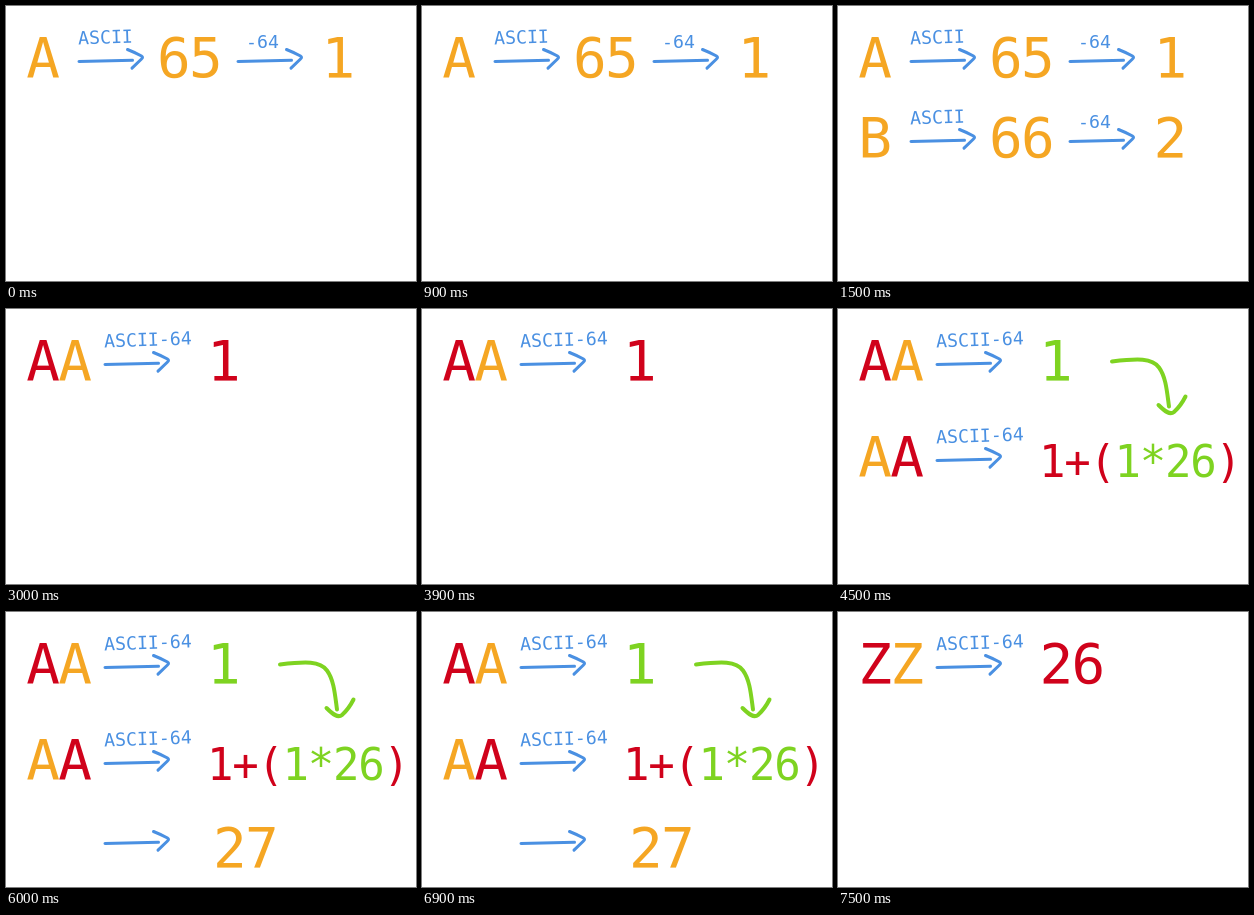
Write an HTML page that moves like this. It is 410x275 px and loops after 8 s.

```html
<!DOCTYPE html>
<html lang="en">
<head>
<meta charset="utf-8">
<title>Letters to numbers</title>
<style>
  html, body { margin: 0; width: 100%; height: 100%; overflow: hidden; background: #fff; }
  svg { display: block; width: 410px; height: 275px; font-family: "DejaVu Sans Mono", monospace; }
  path { fill: none; stroke-linecap: round; stroke-linejoin: round; }
  .big { font-size: 56px; letter-spacing: -1.7px; }
  .medium { font-size: 44px; letter-spacing: -1.3px; }
  .small { font-size: 18.2px; }
</style>
</head>
<body>
<svg id="stage" viewBox="0 0 410 275"></svg>
<script>
const ORANGE = '#f5a623', BLUE = '#4a90e2', RED = '#d0021b', GREEN = '#7ed321';
const LOOP = 8000, STEP = 1500, BASELINE = 71.4;

// Each run is a [string, colour] pair.
const text = (size, x, y, ...runs) =>
  `<text class="${size}" x="${x}" y="${y}">` +
  runs.map(([string, color]) => `<tspan fill="${color}">${string}</tspan>`).join('') +
  '</text>';

const big = (x, ...runs) => text('big', x, BASELINE, ...runs);

const arrow = (x, y) =>
  `<path transform="translate(${x} ${y})" stroke="${BLUE}" stroke-width="3"
    d="M1 0.5 L54.5 -0.7 M49.5 -11.5 Q57 -8.5 63.5 -5 Q65.5 -3.8 63.5 -2 L54 7.2"/>`;

const tilted = (string, x, y) =>
  `<g transform="translate(${x} ${y}) rotate(-2)">${text('small', 0, 0, [string, BLUE])}</g>`;

const shift = (dy, content) => `<g transform="translate(0 ${dy})">${content}</g>`;

const singleRow = (letter, code, result) =>
  big(20.3, [letter, ORANGE]) +
  tilted('ASCII', 72.3, 38.5) + arrow(72, 55) +
  big(151, [code, ORANGE]) +
  text('small', 240, 42, ['-64', BLUE]) + arrow(231, 55) +
  big(315.5, [result, ORANGE]);

const pairRow = (letter, first, second) =>
  big(20.3, [letter, first], [letter, second]) +
  tilted('ASCII-64', 98.3, 38.5) + arrow(98, 55);

const carryArrow =
  `<path stroke="${GREEN}" stroke-width="4"
    d="M274 52.5 C300 49.5 314 49 321 58.5 C328 68 329 83 331 97.5
       M320.5 96 C327 102.5 332 106.5 336 103 C341 98.5 345 92.5 347.5 87.5"/>`;

const rowA = singleRow('A', '65', '1');
const rowB = shift(80, singleRow('B', '66', '2'));
const firstA = pairRow('A', RED, ORANGE);
const sum = firstA + big(201, ['1', GREEN]) + carryArrow +
  shift(96, pairRow('A', ORANGE, RED)) +
  text('medium', 201, 167.5, ['1+(', RED], ['1*26', GREEN], [')', RED]);

const scenes = [
  rowA,
  rowA + rowB,
  firstA + big(201, ['1', RED]),
  sum,
  sum + arrow(98, 231) + shift(183.5, big(207, ['27', ORANGE])),
  pairRow('Z', RED, ORANGE) + big(201.5, ['26', RED])
];

const stage = document.getElementById('stage');
const start = performance.now();
let shown = -1;

function draw() {
  const index = Math.floor(((performance.now() - start) % LOOP) / STEP);
  if (index !== shown) {
    stage.innerHTML = scenes[index];
    shown = index;
  }
  requestAnimationFrame(draw);
}
draw();
</script>
</body>
</html>
```
